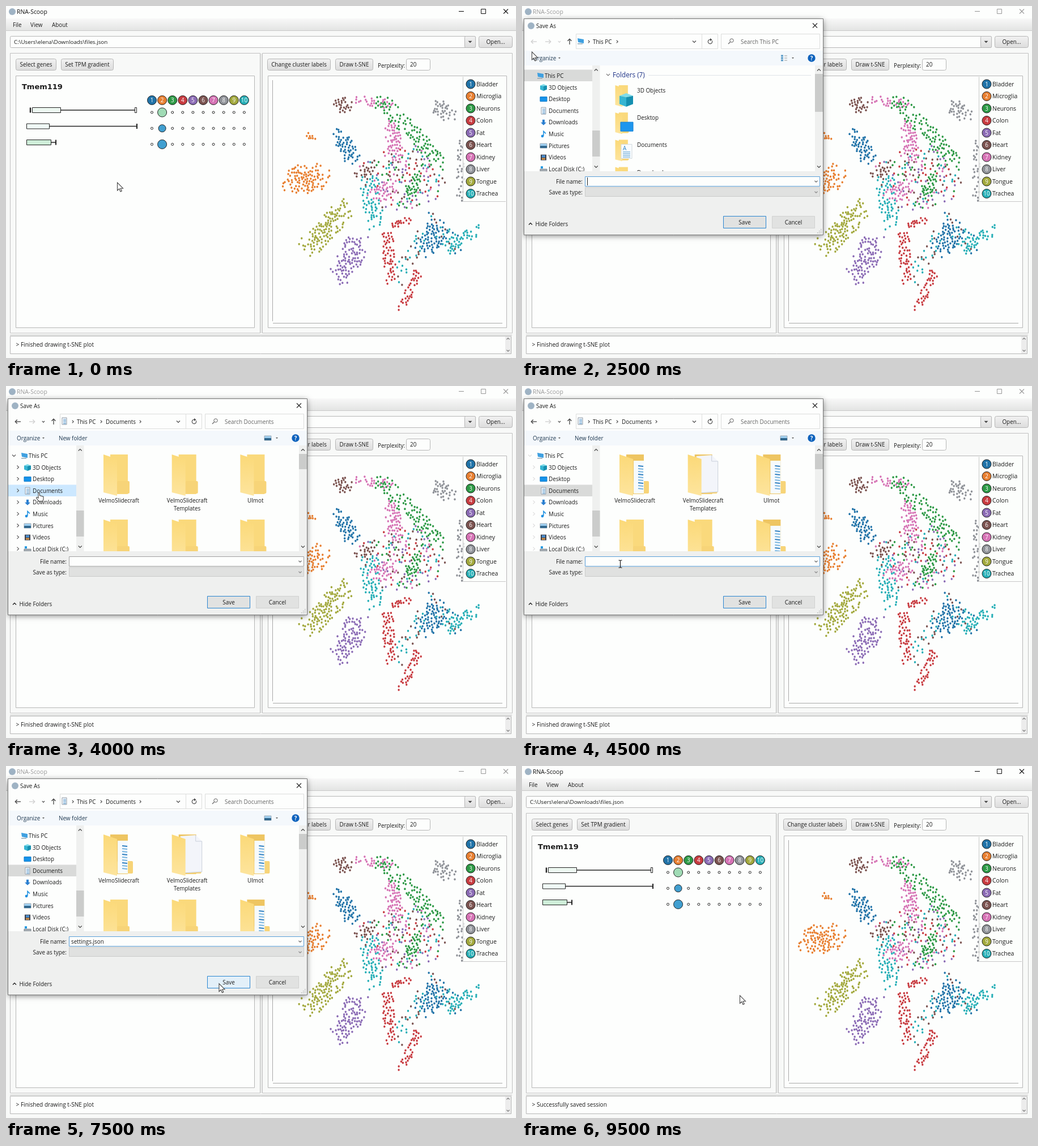
These frames come from a looping animation (900 px wide and 622 px high, 10000 ms). An HTML page with a canvas:

```html
<!DOCTYPE html>
<html lang="en">
<head>
<meta charset="utf-8">
<title>RNA-Scoop: saving a session</title>
<style>
  html, body { margin: 0; width: 100%; height: 100%; overflow: hidden; background: #fdfefd; }
  canvas { display: block; }
</style>
</head>
<body>
<canvas id="stage" width="900" height="622"></canvas>
<script>
const g = document.getElementById('stage').getContext('2d');
const SANS = '"Open Sans", "Noto Sans", sans-serif';
const COLORS = ['#2173a8', '#e87f30', '#2c9945', '#c83b40', '#8b6bb5', '#7b5350', '#d673b5', '#909399', '#a2a83c', '#25aeb6'];
const TISSUES = ['Bladder', 'Microglia', 'Neurons', 'Colon', 'Fat', 'Heart', 'Kidney', 'Liver', 'Tongue', 'Trachea'];
const [BLADDER, MICROGLIA, NEURONS, COLON, FAT, HEART, KIDNEY, LIVER, TONGUE, TRACHEA] = COLORS;
const WHITE = '#fdfefd', INK = '#1c1c1c', PANE = '#f8f9f8', GREY = '#eff0ef', EDGE = '#b6b6b6';

// ---------- drawing helpers ----------
function text(s, x, y, { size = 9.9, color = INK, align = 'left', font = SANS, weight = '' } = {}) {
  g.font = `${weight} ${size}px ${font}`;
  g.fillStyle = color;
  g.textAlign = align;
  g.fillText(s, x, y + size * 0.36);
}
function box(x, y, w, h, fill, stroke, r = 0) {
  g.beginPath();
  g.roundRect(x, y, w, h, r);
  if (fill) { g.fillStyle = fill; g.fill(); }
  if (stroke) { g.strokeStyle = stroke; g.lineWidth = 1; g.stroke(); }
}
function trace(points) {
  g.beginPath();
  for (let i = 0; i < points.length; i += 2) g.lineTo(points[i], points[i + 1]);
}
function line(color, width, ...points) {
  trace(points);
  g.strokeStyle = color;
  g.lineWidth = width;
  g.stroke();
}
function poly(fill, ...points) {
  trace(points);
  g.fillStyle = fill;
  g.fill();
}
function disc(x, y, r, fill, stroke) {
  box(x - r, y - r, 2 * r, 2 * r, fill, stroke, r);
}
function fade(y, h, a, b) {
  const f = g.createLinearGradient(0, y, 0, y + h);
  f.addColorStop(0, a);
  f.addColorStop(1, b);
  return f;
}
function isolate(draw) {
  g.save();
  draw();
  g.restore();
}
function shadowBox(blur, ...args) {
  isolate(() => {
    g.shadowColor = 'rgba(0,0,0,.5)';
    g.shadowBlur = blur;
    g.shadowOffsetY = 2;
    box(...args);
  });
}
// Chevron pointing in direction (dx, dy)
function chevron(x, y, dx, dy, color = '#444', s = 3, w = 1.1) {
  const k = s / 2;
  line(color, w, x - dx * k - dy * s, y - dy * k - dx * s, x + dx * k, y + dy * k,
    x - dx * k + dy * s, y - dy * k + dx * s);
}
function arrow(x, y, dx, dy, color, s = 5) {
  line(color, 1.3, x - dx * s, y - dy * s, x + dx * s, y + dy * s);
  chevron(x + dx * 3, y + dy * 3, dx, dy, color, 3.5, 1.3);
}
function drop(x, y, s = 2) {
  poly('#444', x - s, y - s / 2, x + s, y - s / 2, x, y + s / 2);
}
function cross(x, y, color) {
  for (const s of [4, -4]) line(color, 1.1, x - 4, y - s, x + 4, y + s);
}
function button(label, x, y, w) {
  box(x + .5, y + .5, w - 1, 20, fade(y, 21, '#f2f2f2', '#dcdcdc'), EDGE, 3);
  text(label, x + w / 2, y + 10.5, { align: 'center' });
}
function badge(i, x, y) {
  disc(x, y, 8, COLORS[i], '#222');
  text(i + 1, x, y, { color: '#fff', align: 'center' });
}

// ---------- scatter plot ----------
const dots = [];
let seed = 11;
function rand() {
  seed = (seed * 1664525 + 1013904223) % 4294967296;
  return seed / 4294967296;
}
// Fills the capsule of radius w around a segment with dots that keep apart
function cloud(colors, x1, y1, x2, y2, w, density = .04) {
  const len = Math.hypot(x2 - x1, y2 - y1);
  for (let n = density * (2 * w * len + Math.PI * w * w); n > 0; n--) {
    const t = rand(), a = rand() * 2 * Math.PI, r = w * Math.sqrt(rand());
    const x = x1 + (x2 - x1) * t + r * Math.cos(a), y = y1 + (y2 - y1) * t + r * Math.sin(a);
    const color = colors[Math.floor(rand() * colors.length)];
    if (dots.every(d => Math.hypot(d.x - x, d.y - y) > 3)) dots.push({ x, y, color });
  }
}
cloud([BLADDER], 590, 230, 612, 270, 15);
cloud([BLADDER], 738, 430, 762, 396, 19);
cloud([MICROGLIA], 508, 310, 546, 300, 27);
cloud([MICROGLIA], 530, 225, 543, 236, 5, .09);
cloud([NEURONS], 662, 168, 764, 275, 17, .024);
cloud([NEURONS], 714, 330, 728, 300, 9, .06);
cloud([COLON], 684, 386, 713, 378, 6, .07);
cloud([COLON], 672, 405, 680, 485, 11);
cloud([COLON], 728, 468, 698, 535, 8);
cloud([FAT], 596, 474, 622, 424, 25, .03);
cloud([HEART], 589, 175, 598, 176, 14, .055);
cloud([HEART], 620, 300, 645, 290, 8);
cloud([KIDNEY], 622, 166, 683, 175, 9);
cloud([KIDNEY], 682, 210, 690, 268, 15);
cloud([KIDNEY], 648, 338, 680, 318, 14, .03);
cloud([LIVER], 763, 177, 783, 196, 15);
cloud([LIVER], 803, 240, 803, 345, 8, .02);
cloud([TONGUE], 536, 424, 590, 368, 20);
cloud([TONGUE], 536, 436, 602, 338, 6);
cloud([TRACHEA], 640, 300, 650, 390, 19, .02);
cloud([TRACHEA], 780, 424, 832, 394, 13, .03);
cloud([TRACHEA, HEART], 690, 485, 735, 405, 15, .014);
cloud([TRACHEA, HEART, BLADDER], 755, 375, 790, 425, 18, .02);
cloud([NEURONS, HEART, KIDNEY, TRACHEA, COLON, FAT], 665, 310, 730, 300, 55, .016);

function scatter() {
  line('#a8a8a8', 1, 470.5, 131, 470.5, 557);
  line('#a8a8a8', 1, 471, 560.5, 876, 560.5);
  for (const { x, y, color } of dots) {
    g.beginPath();
    g.ellipse(x, y, 1.7, 2, 0, 0, 7);
    g.fillStyle = color;
    g.fill();
  }
  box(807, 125, 75, 220, 'rgba(253,254,253,.75)');
  line('#c8c8c8', 1, 806.5, 125, 806.5, 345.5, 882, 345.5);
  TISSUES.forEach((name, i) => {
    const y = 138 + 21.5 * i;
    badge(i, 820, y);
    text(name, 830, y, { size: 10.5 });
  });
}

// ---------- main window ----------
function boxPlot(y, x1, x2, end, fill) {
  line('#222', 1.5, x2, y, end, y);
  line('#222', 2, end, y - 4.5, end, y + 4.5);
  box(x1 + .5, y - 4.5, x2 - x1, 9, fill, '#222');
}
function genes() {
  text('Tmem119', 28, 142, { size: 13, weight: 'bold', font: '"DejaVu Sans", sans-serif' });
  line('#222', 2.4, 43, 179.5, 43, 188.5);
  boxPlot(184, 46, 96, 228, '#edf8f1');
  box(227.5, 179.5, 3, 9, WHITE, '#222');
  boxPlot(212.5, 36, 76, 231, '#f0f9f6');
  boxPlot(241, 36, 79, 88, '#ceedd8');
  for (let i = 0; i < 10; i++) {
    const x = 257.5 + 18.1 * i;
    badge(i, x, 166.5);
    for (let row = 0; row < 3; row++) {
      const y = 188 + 28.2 * row;
      if (i === 1) disc(x, y, row === 1 ? 6.5 : 8, row ? '#419fd0' : '#a0dbb5', '#222');
      else disc(x, y, 2, WHITE, '#222');
    }
  }
}
function mainWindow(active, message) {
  const ink = active ? '#111' : '#999';
  box(0, 0, 900, 622, PANE);
  box(0, 0, 900, 22, WHITE);
  disc(11, 10, 6, '#9fb3c4');
  text('RNA-Scoop', 19, 10.5, { size: 10.4, color: ink });
  line(ink, 1.1, 799, 9.5, 808, 9.5);
  box(838.5, 5.5, 8, 8, null, ink);
  cross(882, 9.5, ink);

  box(0, 22, 900, 21, fade(22, 21, '#f8f8f8', '#e3e4e3'));
  line('#c9c9c9', 1, 0, 43.5, 900, 43.5);
  text('File', 12, 33);
  text('View', 43, 33);
  text('About', 81, 33);

  box(7.5, 53.5, 821, 20, WHITE, EDGE, 2);
  box(809.5, 53.5, 19, 20, fade(53, 20, '#f2f2f2', '#dedede'), EDGE, 2);
  drop(819, 63.5, 3.5);
  text('C:\\Users\\elena\\Downloads\\files.json', 14, 63, { size: 9.8 });
  button('Open...', 834, 53, 60);

  for (const x of [7.5, 452.5]) {
    box(x, 83.5, 441, 494.5, PANE, '#c0c0c0');
    box(x + 10, 123.5, 421, 445, WHITE, EDGE);
  }
  box(449, 84, 3, 494, '#e8e9e8');
  button('Select genes', 17, 93, 72);
  button('Set TPM gradient', 97, 93, 93);
  button('Change cluster labels', 461, 93, 112);
  button('Draw t-SNE', 581, 93, 67);
  text('Perplexity:', 656, 105);
  box(706.5, 93.5, 42, 20, WHITE, EDGE, 3);
  text('20', 713, 103.5);
  genes();
  scatter();

  line('#c2c2c2', 1, 7, 581.5, 893, 581.5);
  box(7.5, 583.5, 884, 31, WHITE, EDGE);
  text('> ' + message, 17.5, 598.5, { size: 10.1 });
  box(881, 584, 10, 30, '#ececec');
  chevron(886, 588, 0, -1, '#777', 2.5);
  chevron(886, 609, 0, 1, '#777', 2.5);
}
function fileMenu(hover) {
  box(5, 22, 29, 21, '#0a96c9');
  text('File', 12, 33, { color: '#fff' });
  shadowBox(8, 6, 44, 114, 70, PANE);
  box(5.5, 44.5, 114, 69.5, null, '#c4c4c4');
  if (hover) box(6, 47, 113, 22, '#0a96c9');
  ['Save session', 'Load previous session', 'Reset session'].forEach((label, i) =>
    text(label, 10.5, 58 + 21.5 * i, { size: 9.7, color: hover && !i ? '#fff' : INK }));
}

// ---------- dialog ----------
const ICONS = {
  pc(x, y) {
    poly('#3fa0e0', x - 5, y - 5, x + 6, y - 3, x + 6, y + 4, x - 4, y + 2);
    box(x - 5, y + 4, 9, 1.5, '#8fa4b3');
  },
  cube(x, y, s = 6) {
    const h = s * .6;
    poly('#7fdcea', x, y - s, x + s, y - h, x, y - s + h, x - s, y - h);
    poly('#35b5d2', x - s, y - h, x, y - s + h, x, y + s, x - s, y + h);
    poly('#1590b0', x + s, y - h, x, y - s + h, x, y + s, x + s, y + h);
  },
  desk(x, y) { box(x - 6, y - 4, 12, 8, '#1593ea', '#0d79c8'); },
  doc(x, y) {
    box(x - 4, y - 6, 8, 12, '#fafcff', '#8f9aa5');
    for (let i = -3; i < 5; i += 2.5) line('#4b8fc4', 1, x - 2, y + i, x + 3, y + i);
  },
  down(x, y) {
    box(x - 2, y - 5, 4, 6, '#2b7fd0');
    poly('#2b7fd0', x - 5, y, x + 5, y, x, y + 5);
  },
  note(x, y) {
    line('#1a8fe0', 1.5, x, y + 3, x, y - 5, x + 4, y - 1);
    disc(x - 2, y + 3.5, 2.3, '#1a8fe0');
  },
  pic(x, y) {
    box(x - 6, y - 4, 12, 8, '#9fd0f2', '#a5adb5');
    box(x - 6, y, 12, 4, '#31678d');
  },
  film(x, y) {
    box(x - 5, y - 5, 10, 10, '#3a3f4b');
    box(x - 3, y - 4, 6, 4, '#4a8fd0');
    box(x - 3, y + 1, 6, 3, '#d08f45');
  },
  disk(x, y) {
    box(x - 6, y, 12, 4, '#a7adb3', '#7c848b');
    box(x - 5, y - 5, 4, 4, '#1e97e0');
  }
};
const TREE = { '3D Objects': 'cube', Desktop: 'desk', Documents: 'doc', Downloads: 'down',
  Music: 'note', Pictures: 'pic', Videos: 'film', 'Local Disk (C:)': 'disk' };

function tree(step) {
  const tone = step === 7 || step === 8 ? '#555' : step === 9 ? '#dcdcdc' : null;
  if (step < 8) box(4, 112.5, 120, 20.5, '#d9dad9');
  if (step > 6) box(4, 174.5, 120, 20.5, step === 7 ? '#e3f2fd' : step === 8 ? '#cce8ff' : '#d9dad9');
  if (tone) chevron(14, 123, 0, 1, tone);
  ICONS.pc(32, 123);
  text('This PC', 40, 123);
  Object.entries(TREE).forEach(([name, icon], i) => {
    const y = 144 + 20.6 * i;
    if (tone) chevron(21, y - .5, 1, 0, tone);
    ICONS[icon](38, y);
    text(name, 47, y);
  });
}
function folder(x, y, scale, inside) {
  isolate(() => {
    g.translate(x, y);
    g.scale(scale, scale);
    box(12, 0, 31, 70, inside ? '#eec562' : '#fad97c');
    box(24, 47, 28 - (inside ? 0 : 6), 22, '#f7d478', null, 2);
    if (inside === 'pages') {
      box(25, 11, 18, 58, '#f6fafd');
      for (let i = 0; i < 9; i++) line(i % 3 ? '#77b4df' : '#2e7fc0', 2, 33, 20 + i * 5, 42, 21 + i * 5);
    } else if (inside === 'sheet') {
      poly('#f3f5fa', 15, 3, 42, 1, 53, 12, 53, 66, 19, 68);
      line('#c9cfdb', 1, 42, 1, 42, 12, 53, 12, 53, 66, 19, 68);
    }
    poly(fade(0, 70, '#fbd978', '#fde49c'), 0, 0, 24, 8, 24, 73, 0, 67);
  });
}
function drives() {
  chevron(152, 121.5, 0, 1, '#777');
  text('Folders (7)', 160, 122, { size: 11.7, color: '#1e3287' });
  line('#dfe3e8', 1, 223, 122.5, 510, 122.5);
  ['3D Objects', 'Desktop', 'Documents', 'Downloads'].forEach((name, i) => {
    const y = 140 + 48.2 * i;
    folder(164.5, y, .52);
    if (i === 0) ICONS.cube(184, y + 26, 12);
    if (i === 1) box(174, y + 17, 22, 16, '#1e96ee', '#0e7fd4');
    if (i === 2) {
      box(175, y + 8, 19, 25, '#f8fbfd', '#d2d9de');
      text('A', 181, y + 15, { color: '#2b84c4', align: 'center' });
      for (let k = 0; k < 4; k++) line('#4a98cf', 1, 178, y + 21.5 + k * 3, 191, y + 21.5 + k * 3);
    }
    text(name, 203, y + 9.5);
  });
}
function documents(loaded) {
  ['pages', 'sheet', 'pages', '', '', 'pages'].forEach((kind, i) =>
    folder(172 + 120.7 * (i % 3), i < 3 ? 121 : 236, 1, loaded && kind));
  ['VelmoSlidecraft', 'VelmoSlidecraft\nTemplates', 'Ulmot'].forEach((name, i) =>
    name.split('\n').forEach((s, row) =>
      text(s, 199 + 120.6 * i, 202.5 + 13.5 * row, { align: 'center' })));
}
function scrollBar(x, w, y, h) {
  box(x, 105, w, 187, GREY);
  box(x, y, w, h, '#cbcccb');
  chevron(x + w / 2, 113, 0, -1);
  chevron(x + w / 2, 284, 0, 1);
}
function addressBar(inDocs) {
  const dim = '#cfcfcf', dark = '#444', back = inDocs ? dark : dim;
  arrow(21, 63, -1, 0, back);
  arrow(46, 63, 1, 0, dim);
  chevron(66, 63, 0, 1, back, 2.2);
  arrow(84, 63, 0, -1, dark);
  box(95.5, 49.5, 250, 26, WHITE, '#dcdddc');
  line('#dcdddc', 1, 317.5, 49, 317.5, 75);
  ICONS[inDocs ? 'doc' : 'pc'](103, 62);
  text('This PC', 125, 63);
  if (inDocs) text('Documents', 176, 63);
  for (const x of inDocs ? [118, 168, 237] : [118, 168]) chevron(x, 63, 1, 0, dark, 2.4);
  chevron(304, 63, 0, 1, dark);
  g.beginPath();
  g.arc(332, 63, 3.7, -.5, 4.7);
  g.stroke();
  poly(dark, 332, 57, 335.5, 59.5, 332, 62);
  box(351.5, 49.5, 174, 26, WHITE, '#dcdddc');
  disc(370, 61, 3.2, WHITE, '#666');
  line('#666', 1.2, 367.5, 63.5, 364, 67);
  text('Search ' + (inDocs ? 'Documents' : 'This PC'), 386, 63, { color: '#666' });
}
function toolBar(inDocs) {
  box(4, 79, 527, 26, '#f4f8fc');
  text('Organize', 19, 92.5, { color: '#1e3850' });
  if (inDocs) {
    text('New folder', 93, 92.5, { color: '#1e3850' });
    ICONS.pic(462, 92);
  } else {
    for (const y of [88, 92, 96]) {
      box(457, y - 1.5, 4, 3, '#5c9cc8');
      line('#999', 1, 463, y, 468, y);
    }
  }
  drop(66, 92);
  drop(478, 92);
  disc(511, 92, 6.7, '#0e62bd');
  text('?', 511, 92, { color: '#fff', align: 'center', weight: 'bold' });
}
function typed(step) {
  const length = { 10: 2, 11: 8, 12: 10 }[step] ?? 13;
  return step < 10 ? '' : 'settings.json'.slice(0, length);
}
function fields(step) {
  box(4, 292, 527, 112, GREY);
  text('File name:', 107, 310.5, { align: 'right' });
  text('Save as type:', 107, 329.5, { align: 'right' });
  box(111.5, 301.5, 414, 17, WHITE, step === 8 ? '#a0a0a0' : '#5a9fd8');
  box(111.5, 320.5, 414, 16, '#e0e1e0', '#cbcccb');
  chevron(519, 310, 0, 1, '#666', 2.5);
  chevron(519, 329, 0, 1, '#888', 2.5);
  const name = typed(step);
  text(name, 115, 310);
  if (![8, 9, 15].includes(step)) {
    const x = 115.5 + Math.round(g.measureText(name).width);
    line('#222', 1, x, 303, x, 317);
  }
  chevron(15, 385, 0, -1, '#222', 3, 1.3);
  text('Hide Folders', 23.5, 385);
  box(355.5, 371.5, 75, 21, step === 15 ? '#e3f0f9' : '#e1e2e1', '#2a86d0');
  text('Save', 393, 382.5, { align: 'center' });
  box(441.5, 371.5, 75, 21, '#e1e2e1', '#d0d1d0');
  text('Cancel', 479, 382.5, { align: 'center' });
  for (let a = 0; a < 3; a++)
    for (let b = 0; a + b < 3; b++) box(527 - a * 3, 400 - b * 3, 1.5, 1.5, '#b5b5b5');
}
function dialog(step) {
  const inDocs = step >= 8;
  shadowBox(10, 4, 23, 527, 381, WHITE);
  disc(16, 35, 6, '#9fb3c4');
  text('Save As', 25, 35);
  cross(517, 34.5, '#222');
  addressBar(inDocs);
  toolBar(inDocs);
  tree(step);
  inDocs ? documents(step > 8) : drives();
  scrollBar(124, 13.5, 220, 46);
  scrollBar(517, 14, 120, inDocs ? 27 : 67);
  fields(step);
  box(3.5, 22.5, 528, 382, null, '#777');
}

// ---------- pointer ----------
const POINTER = {
  arrow: 'M0 0V14L3.3 11L5.5 16L7.8 15L5.6 10.2H10Z',
  hand: 'M0 1Q1.3-1 2.4 1V5L9 7V12L7.5 15H1L-3.5 9.5Q-3.5 7.5-1.5 8.2L0 9.5Z',
  beam: 'M-3-6.5H-1L0-5.5L1-6.5H3M0-5.5V5.5M-3 6.5H-1L0 5.5L1 6.5H3'
};
// First half-second step of each pose; no kind means hidden
const MOVES = [
  [0, 'arrow', 196.5, 312], [1, 'arrow', 64.5, 127], [2, 'arrow', 18.5, 41], [4, 'arrow', 17.5, 64],
  [5, 'arrow', 17.5, 81], [7, 'hand', 57, 188.5], [9, 'beam', 173.5, 314.5], [11],
  [14, 'arrow', 193.5, 320.5], [15, 'arrow', 376, 384.5], [19, 'arrow', 384.5, 405.5]
];
function pointer(step) {
  const [, kind, x, y] = MOVES.findLast(m => m[0] <= step);
  if (!kind) return;
  const shape = new Path2D(POINTER[kind]);
  isolate(() => {
    g.translate(x, y);
    g.fillStyle = '#fff';
    if (kind !== 'beam') g.fill(shape);
    g.strokeStyle = kind === 'beam' ? '#111' : '#444';
    g.lineWidth = 1.1;
    g.stroke(shape);
  });
}

let shown = -1;
function frame() {
  const step = Math.floor(performance.now() % 10000 / 500);
  if (step !== shown) {
    shown = step;
    const saving = step >= 5 && step < 16;
    mainWindow(!saving, step < 16 ? 'Finished drawing t-SNE plot' : 'Successfully saved session');
    if (step === 3 || step === 4) fileMenu(step === 4);
    if (saving) dialog(step);
    pointer(step);
  }
  requestAnimationFrame(frame);
}
frame();
</script>
</body>
</html>
```
